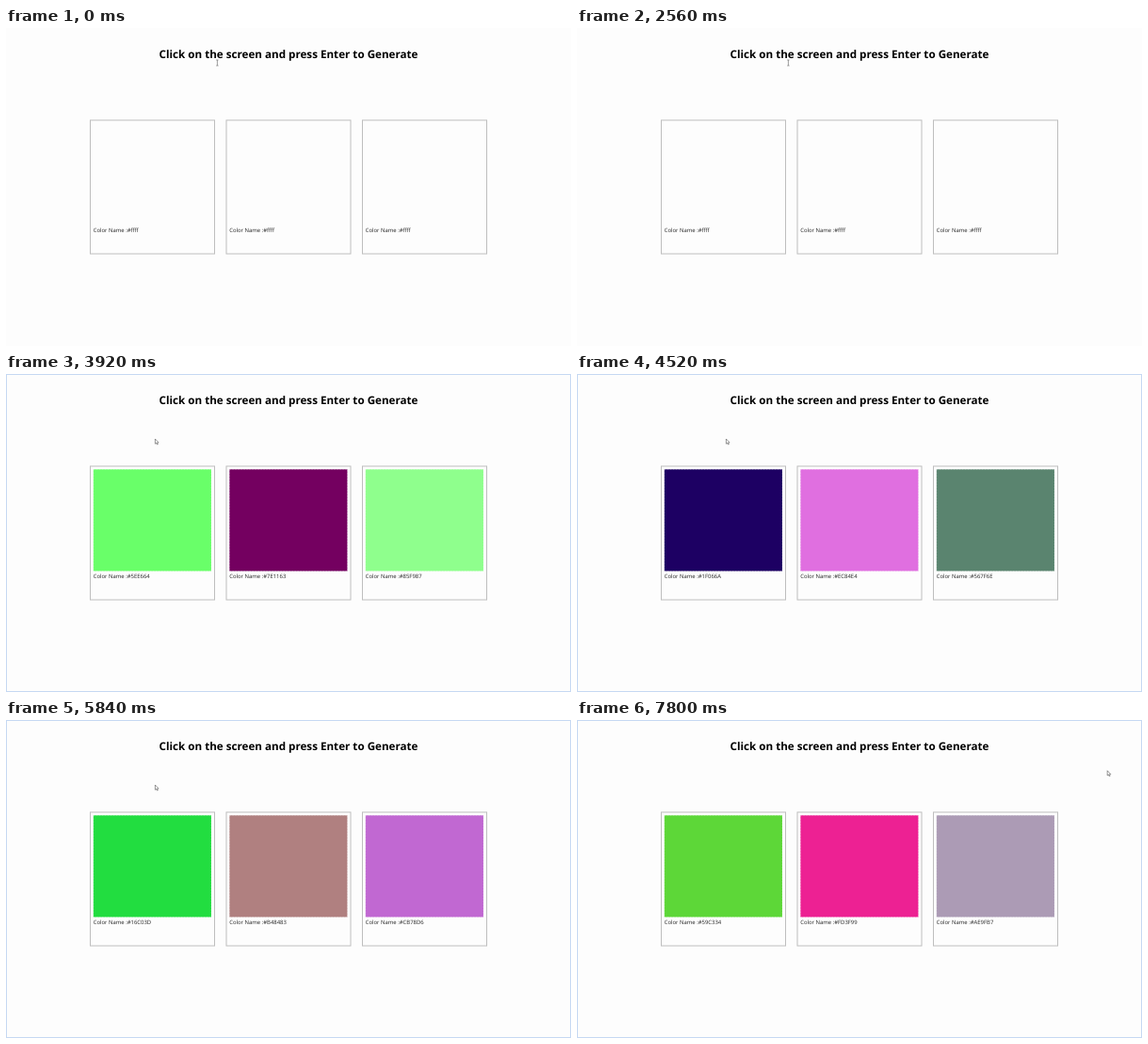
Write an HTML page that moves like this. It is 600 px wide and 338 px high and loops after 7840 ms.

```html
<!DOCTYPE html>
<html lang="en">
<head>
<meta charset="utf-8">
<title>Color generator</title>
<style>
  html, body { margin: 0; width: 100%; height: 100%; overflow: hidden; background: #fdfdfd; }
  svg { display: block; width: 100vw; height: 100vh; }
  text { font-family: "Open Sans", "Noto Sans", sans-serif; text-rendering: geometricPrecision; font-variant-ligatures: none; }
  .title { font-size: 11.65px; font-weight: 700; text-anchor: middle; }
  .label { font-size: 5.93px; fill: #222; }
  .card { fill: none; stroke: #bebebe; }
  .edge { fill: none; stroke: #fff; stroke-opacity: .4; stroke-width: .6; stroke-dasharray: 1.5 1.5; }
</style>
</head>
<body>
<svg id="stage" viewBox="0 0 600 338">
  <rect width="600" height="338" fill="#fdfdfd"/>
  <rect id="focus" x=".5" y=".5" width="599" height="337" fill="none" stroke="#c5d8f2"/>
  <text class="title" x="300" y="32">Click on the screen and press Enter to Generate</text>
  <g id="cards"></g>
  <path id="beam" d="M-1.2-3h2.4M0-3v6M-1.2 3h2.4" fill="none" stroke="#777" stroke-width=".7"/>
  <path id="arrow" d="M0 0v5.2l1.2-1 .8 1.8 .9-.4-.8-1.7h1.6z" fill="#fff" stroke="#444" stroke-width=".55"/>
</svg>
<script>
const LOOP = 7840, STEP = 40;
const FOCUS_AT = 2800;

// Each palette: start time, then [fill, label] for the three cards.
const palettes = [
  { at: 0, colors: Array(3).fill(["none", "#ffff"]) },
  { at: 3720, colors: [["#69ff69", "#5EE664"], ["#740060", "#7E1163"], ["#8fff8d", "#85F987"]] },
  { at: 4480, colors: [["#1d0063", "#1F066A"], ["#e06fe0", "#EC84E4"], ["#5a846f", "#567F6E"]] },
  { at: 5400, colors: [["#22dd40", "#16C03D"], ["#b08080", "#B48483"], ["#c168d2", "#CB78D6"]] },
  { at: 6200, colors: [["#b2ff2a", "#B2F223"], ["#0c868f", "#047C93"], ["#a600b0", "#B510B8"]] },
  { at: 7080, colors: [["#5dd738", "#59C334"], ["#ed2193", "#FD3F99"], ["#ac9bb5", "#AE9FB7"]] }
];

// Pointer stops: time, x, y
const stops = [
  [0, 224.4, 37], [2580, 224.4, 37], [2760, 158.4, 69],
  [6240, 158.4, 69], [6500, 305.4, 155.8], [6760, 305.4, 155.8],
  [7280, 563.2, 53.8], [LOOP, 563.2, 53.8]
];

const byId = id => document.getElementById(id);

function add(parent, tag, attrs) {
  const node = document.createElementNS("http://www.w3.org/2000/svg", tag);
  for (const key in attrs) node.setAttribute(key, attrs[key]);
  return parent.appendChild(node);
}

const cards = [89.5, 234, 378.5].map(x => {
  const group = byId("cards");
  add(group, "rect", { class: "card", x, y: 98, width: 132, height: 142 });
  const area = { x: x + 3.3, y: 101.3, width: 125.2, height: 108.2 };
  return {
    swatch: add(group, "rect", area),
    edge: add(group, "rect", { ...area, class: "edge" }),
    label: add(group, "text", { class: "label", x: x + 3.2, y: 216.5 })
  };
});

const ease = u => u * u * (3 - 2 * u);

function pointerAt(t) {
  const i = stops.findIndex(stop => stop[0] > t);
  const [t0, x0, y0] = stops[i - 1], [t1, x1, y1] = stops[i];
  const u = ease((t - t0) / (t1 - t0));
  return [x0 + (x1 - x0) * u, y0 + (y1 - y0) * u];
}

function show(node, visible) {
  node.setAttribute("visibility", visible ? "visible" : "hidden");
}

function render(t) {
  const { colors } = palettes.filter(p => p.at <= t).pop();
  cards.forEach(({ swatch, edge, label }, i) => {
    const [fill, name] = colors[i];
    swatch.setAttribute("fill", fill);
    show(edge, fill !== "none");
    label.textContent = "Color Name :" + name;
  });

  show(byId("focus"), t >= FOCUS_AT);

  const [x, y] = pointerAt(t);
  const overTitle = t < FOCUS_AT && y < 40;
  for (const id of ["beam", "arrow"]) {
    byId(id).setAttribute("transform", `translate(${x} ${y})`);
    show(byId(id), (id === "beam") === overTitle);
  }
}

const start = performance.now();
function tick() {
  const t = (performance.now() - start) % LOOP;
  render(Math.floor(t / STEP) * STEP);
  requestAnimationFrame(tick);
}
tick();
</script>
</body>
</html>
```
